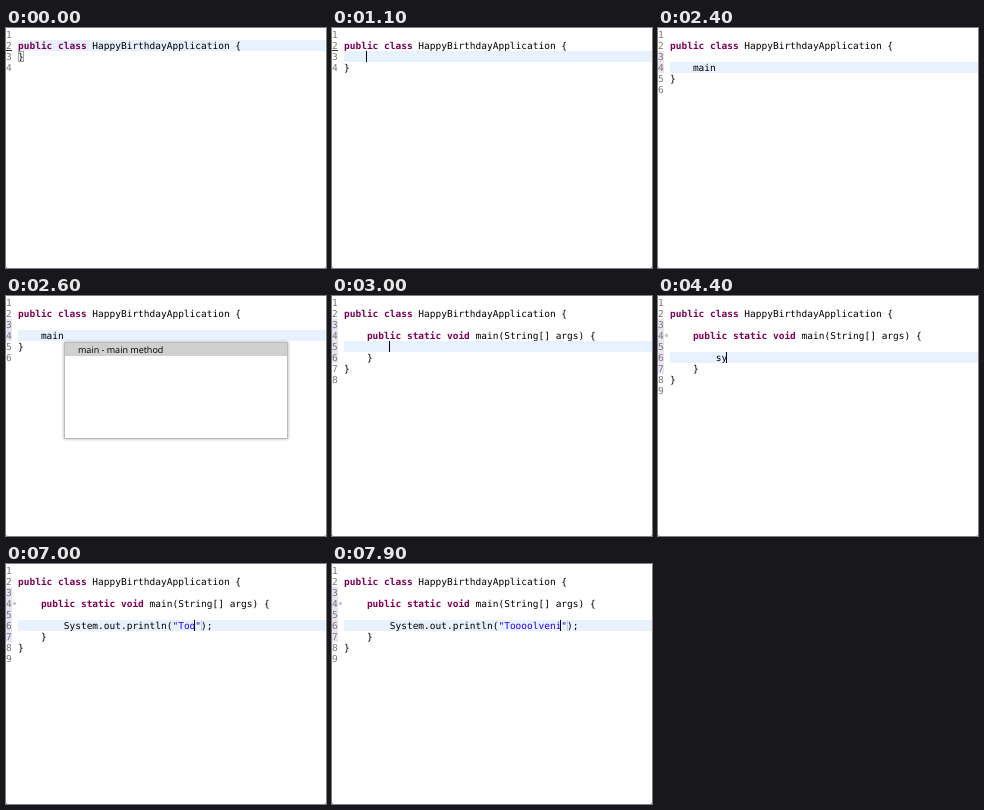
An HTML page with a canvas for the animation above (8 s loop, 320 by 240 pixels).

```html
<!DOCTYPE html>
<html lang="en">
<head>
<meta charset="utf-8">
<title>Typing in a Java editor</title>
<style>
  html, body { margin: 0; width: 100%; height: 100%; overflow: hidden; background: #fff; }
  canvas { display: block; width: 320px; height: 240px; }
</style>
</head>
<body>
<canvas width="320" height="240"></canvas>
<script>
const ctx = document.querySelector('canvas').getContext('2d');
const LOOP = 8000, LEFT = 12, LINE = 11, CHAR = 5.72;
const FONT = '9.5px "DejaVu Sans Mono", monospace';
const MAIN = '    public static void main(String[] args) {';
const CALL = '        System.out.println(';
const WORD = 'Toooolveni';

// Each step changes part of the editor state; caret is a column, or null while hidden.
const steps = [
  [0, { body: [], count: 4, row: 2, caret: null, changed: 0, brace: true, mark: true }],
  [800, { caret: 39 }],
  [1100, { body: [''], row: 3, caret: 4, brace: false }],
  [1200, { count: 5, changed: 3, mark: false }],
  [1300, { body: ['', ''], row: 4 }],
  [1400, { count: 6, changed: 4 }],
  [1900, { caret: null }],
  ...type('main', 2000, 100, 4, text => ['', '    ' + text]),
  [2400, { caret: null }],
  [2600, { popup: true }],
  [3000, { body: ['', MAIN, '', '    }'], count: 8, row: 5, caret: 8, changed: 6, popup: false }],
  [3500, { body: inMain(''), row: 6 }],
  [3600, { count: 9, changed: 7 }],
  [4100, { caret: null, fold: true }],
  ...type('s', 4200, 0, 8, text => inMain('        ' + text)),
  [4400, { body: inMain('        sy'), caret: 10 }],
  [4700, { body: inMain('        sys'), caret: 11 }],
  [4800, { body: inMain('        syso'), caret: 12 }],
  [4900, { caret: null }],
  [5100, { body: inMain(CALL + ');'), caret: 27, end: 29 }],
  [5300, { paren: true }],
  [5800, { caret: null }],
  [6200, { ...quoted(0), paren: false }],
  ...[6700, 6900, 7000, 7200, 7300, 7400, 7500, 7600, 7700, 7800]
    .map((time, i) => [time, quoted(i + 1)])
];

function inMain(line) {
  return ['', MAIN, '', line, '    }'];
}

function type(word, start, gap, column, body) {
  return [...word].map((_, i) =>
    [start + i * gap, { body: body(word.slice(0, i + 1)), caret: column + i + 1 }]);
}

function quoted(length) {
  return {
    body: inMain(`${CALL}"${WORD.slice(0, length)}");`),
    caret: 28 + length,
    end: 29 + length
  };
}

const columnX = column => LEFT + column * CHAR;
const rowTop = row => (row - 1) * LINE + 1;

function rect(x, y, w, h, color) {
  ctx.fillStyle = color;
  ctx.fillRect(x, y, w, h);
}

function box(x, y, w, h, color) {
  ctx.strokeStyle = color;
  ctx.lineWidth = 1;
  ctx.strokeRect(x + 0.5, y + 0.5, w - 1, h - 1);
}

function text(string, x, y, color, font = FONT) {
  ctx.font = font;
  ctx.fillStyle = color;
  ctx.fillText(string, x, y);
}

function codeLine(line, row) {
  for (const { 0: token, index } of line.matchAll(/"[^"]*"|\b(?:public|class|static|void)\b|[^\s"]+/g)) {
    const keyword = /^(public|class|static|void)$/.test(token);
    const color = keyword ? '#7f0055' : token[0] === '"' ? '#2a00ff' : '#000';
    text(token, columnX(index), row * LINE - 1, color, keyword ? 'bold ' + FONT : FONT);
  }
}

function popup() {
  ctx.save();
  ctx.shadowColor = '#0005';
  ctx.shadowBlur = 3;
  rect(58, 46, 224, 97, '#fff');
  ctx.restore();
  box(58, 46, 224, 97, '#bbb');
  rect(59, 47, 222, 13, '#d0d0d0');
  text('main - main method', 72, 57, '#000', '9px "Open Sans", sans-serif');
}

function draw(state) {
  rect(0, 0, 320, 240, '#fff');
  rect(LEFT, rowTop(state.row), 320 - LEFT, LINE, '#e8f2fe');
  if (state.changed) rect(0, rowTop(3), 6, (state.changed - 2) * LINE, '#eae3f1');

  for (let row = 1; row <= state.count; row++) text(row, 0, row * LINE - 1, '#787878');
  if (state.mark) rect(0, 22, 6, 1, '#333');
  if (state.fold) {
    ctx.beginPath();
    ctx.arc(8.5, 39.5, 1.8, 0, 7);
    ctx.fillStyle = '#c5cad2';
    ctx.fill();
  }

  ['', 'public class HappyBirthdayApplication {', ...state.body, '}']
    .forEach((line, i) => codeLine(line, i + 1));

  if (state.brace) box(12, 23, 6, 11, '#a0a0a0');
  if (state.paren) box(166, 56, 7, 11, '#b0b0b0');
  if (state.end) rect(Math.round(columnX(state.end)), rowTop(6), 1, LINE, '#c3d3cf');
  if (state.caret !== null) rect(Math.round(columnX(state.caret)) - 1, rowTop(state.row), 1, LINE, '#000');
  if (state.popup) popup();

  for (const x of [0, 319]) rect(x, 239, 1, 1, '#aaa');
}

function frame() {
  const time = performance.now() % LOOP;
  draw(Object.assign({}, ...steps.filter(([start]) => start <= time).map(([, change]) => change)));
  requestAnimationFrame(frame);
}

ctx.textRendering = 'geometricPrecision';
frame();
</script>
</body>
</html>
```
